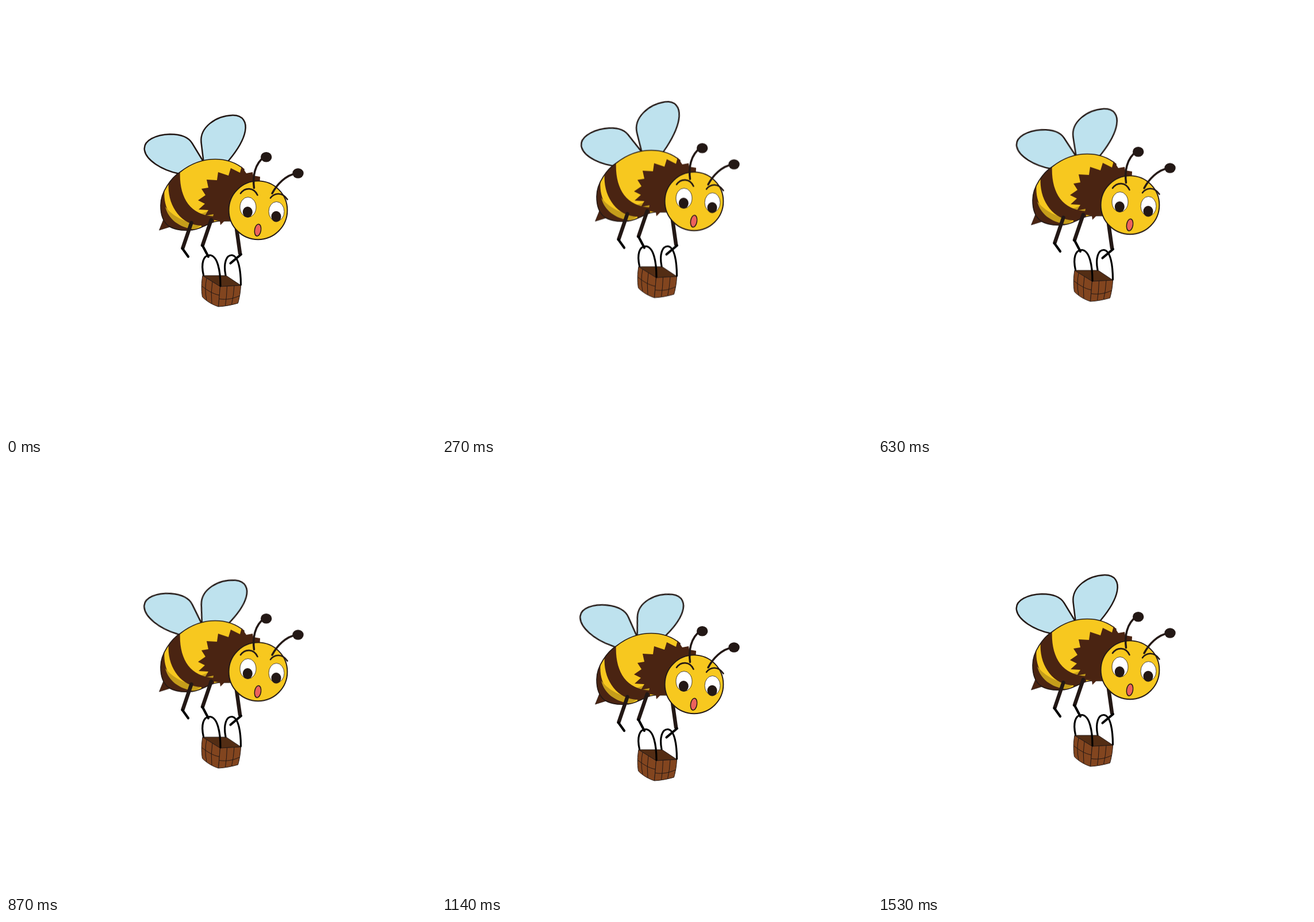
Write an HTML page that moves like this. It is 748 by 748 pixels and loops after 1.62 s.

```html
<!DOCTYPE html>
<html lang="en">
<head>
<meta charset="utf-8">
<title>Bee with basket</title>
<style>
  html, body { margin: 0; width: 100%; height: 100%; overflow: hidden; background: #fff; }
  svg { display: block; width: 100vw; height: 100vh; }
  .line { fill: none; stroke: #231815; stroke-linecap: round; stroke-linejoin: round; }
  .ink { fill: #231815; }
  .brown { fill: #4a2412; }
  .yellow { fill: #f7c81f; }
  #wings { transform-origin: 328.6px 240.5px; }
</style>
</head>
<body>
<svg viewBox="0 0 748 748">
  <defs>
    <path id="shape" d="M269 347C269 323 288 298 304 288C322 274 342 266.500 364 266.500C384 266.500 401 273 414 284L400 374L372 374C360 374 352 380 342 384C334 388 327 390 318 390C304 391 290 388 282 382C272 374 269 362 269 347Z"/>
    <clipPath id="inside"><use href="#shape"/></clipPath>
  </defs>
  <g id="bee">
    <g id="wings" fill="#bee2ee" stroke="#231815" stroke-width="2.5" stroke-linejoin="round">
      <path d="M352 285L324 239C317 227 303 223 285 223C262 224 238 233 241 251C244 268 270 285 300 291.500L320 297Z"/>
      <path d="M346 290L339.500 237C337 211 365 191 394 190C413 189.500 419 203 416 218C413 234 403 250 388 268L374 284Z"/>
    </g>

    <path class="brown" d="M275 369L266.500 390L289 383Z" stroke="#231815" stroke-width=".7"/>
    <use href="#shape" class="yellow"/>
    <g clip-path="url(#inside)">
      <path class="brown" d="M276 318C272 350 288 380 328 389L300 400L255 390V318Z"/>
      <path d="M277 349C290 366 312 377 340 381L328 389C300 385 282 370 277 349Z" fill="#c59d1b"/>
      <path d="M336 362C346 360 355 355 361 350V370Z" fill="#c59d1b"/>
      <path class="brown" d="M303 284C300 330 318 364 362 366V376L340 392L340 382C303 381 279 345 283 305Z"/>
    </g>
    <use href="#shape" class="line" stroke-width="1.6"/>

    <path class="brown" d="M442 297L430 295L429 289L418 291L410 279L407 290L391 282L387 295L369 289L367 303L349 302L352 316L340 318L347 329L334 338L346 344L335 354L352 355L346 365L361 362L359 372L372 374L373 381L380 374L395 373L440 340Z"/>

    <g class="line" stroke-width="6.500">
      <path d="M322.500 377L307.500 421"/>
      <path d="M357 372L342 416"/>
      <path d="M400 380L407 430"/>
      <path d="M307 422L317 436" stroke="#000" stroke-width="4.200"/>
      <path d="M342 417L352 436" stroke="#000" stroke-width="4.200"/>
      <path d="M409 432L390.500 447.500" stroke="#000" stroke-width="4.200"/>
    </g>

    <circle class="yellow" cx="438.500" cy="355.300" r="50.900" stroke="#231815" stroke-width="1.900"/>
    <g fill="#fff" stroke="#231815" stroke-width=".8">
      <ellipse cx="421" cy="350" rx="14" ry="17.500"/>
      <ellipse cx="470.500" cy="357.500" rx="13.500" ry="17"/>
    </g>
    <ellipse class="ink" cx="420.300" cy="358.500" rx="8.500" ry="9.500"/>
    <ellipse class="ink" cx="470" cy="366.200" rx="8.500" ry="9.500"/>
    <ellipse cx="438" cy="389.800" rx="5.500" ry="10.500" transform="rotate(9 438 389.800)" fill="#ec625c" stroke="#231815" stroke-width="1.500"/>
    <g class="line" stroke-width="2.600">
      <path d="M408 326C416 315 431 315 437.500 329"/>
      <path d="M460 334C467 325 480 323 489.500 336.500"/>
    </g>
    <g class="line" stroke-width="3.500">
      <path d="M431.500 316.500C429 298 432 274 450 262"/>
      <path d="M463 326C471 311 486 294 506 291"/>
    </g>
    <ellipse class="ink" cx="452.700" cy="262.700" rx="9.700" ry="8.800"/>
    <ellipse class="ink" cx="508" cy="291" rx="9.700" ry="8.800"/>

    <g stroke="#231815" stroke-width="1" stroke-linejoin="round">
      <path d="M342 469L383 469L408.500 486L372.500 488Z" fill="#532d14"/>
      <path d="M342 469L372.500 488L369.500 523C360 520 349 514 341.500 506C339.500 493 340 481 342 469Z" fill="#82451f"/>
      <path d="M372.500 488L408.500 486C408 498 406 508 403.500 517C393 520 381 522.500 369.500 523Z" fill="#82451f"/>
      <path d="M349 473.500Q345 492 349 512M359 479.500Q356 499 358 518M340.500 487C349 494 360 501 371 503M384.500 487.500Q384 505 381.500 521.500M397 486.500Q396 504 392.500 519.500M371 509.500C384 511.500 396 509 406 504" fill="none"/>
    </g>
    <g class="line" style="stroke:#000" stroke-width="3.200">
      <path d="M343.500 468C339 448 343 433 355 433.500C368 435 373 460 373 487"/>
      <path d="M382 468C378 448 383 433 393 433.500C405 435 408.500 462 408.500 485"/>
    </g>
  </g>
</svg>
<script>
  const LOOP = 1620, STEP = 30, LAST = 1530;

  // [time in ms, value]
  const lift = [[0, 0], [390, -22.4], [795, 0], [1202, 33], [1563, 0]];
  const tilt = [[0, 0], [312, -7.4], [1080, 7.8], [1500, 0], [LOOP, 0]];

  const linear = p => p;
  const smooth = p => (1 - Math.cos(Math.PI * p)) / 2;

  function valueAt(keys, t, ease) {
    const i = keys.findIndex(k => k[0] > t);
    const [t0, a] = keys[i - 1], [t1, b] = keys[i];
    return a + (b - a) * ease((t - t0) / (t1 - t0));
  }

  function play(id, keys, ease, toTransform) {
    const frames = [];
    for (let t = 0; t <= LOOP; t += STEP) {
      const v = valueAt(keys, Math.min(t, LAST), ease);
      frames.push({ offset: t / LOOP, transform: toTransform(v), easing: "steps(1, end)" });
    }
    const anim = document.getElementById(id).animate(frames, { duration: LOOP, iterations: Infinity });
    anim.startTime = document.timeline.currentTime;
  }

  play("bee", lift, linear, v => `translateY(${v.toFixed(2)}px)`);
  play("wings", tilt, smooth, v => `rotate(${v.toFixed(2)}deg)`);
</script>
</body>
</html>
```
